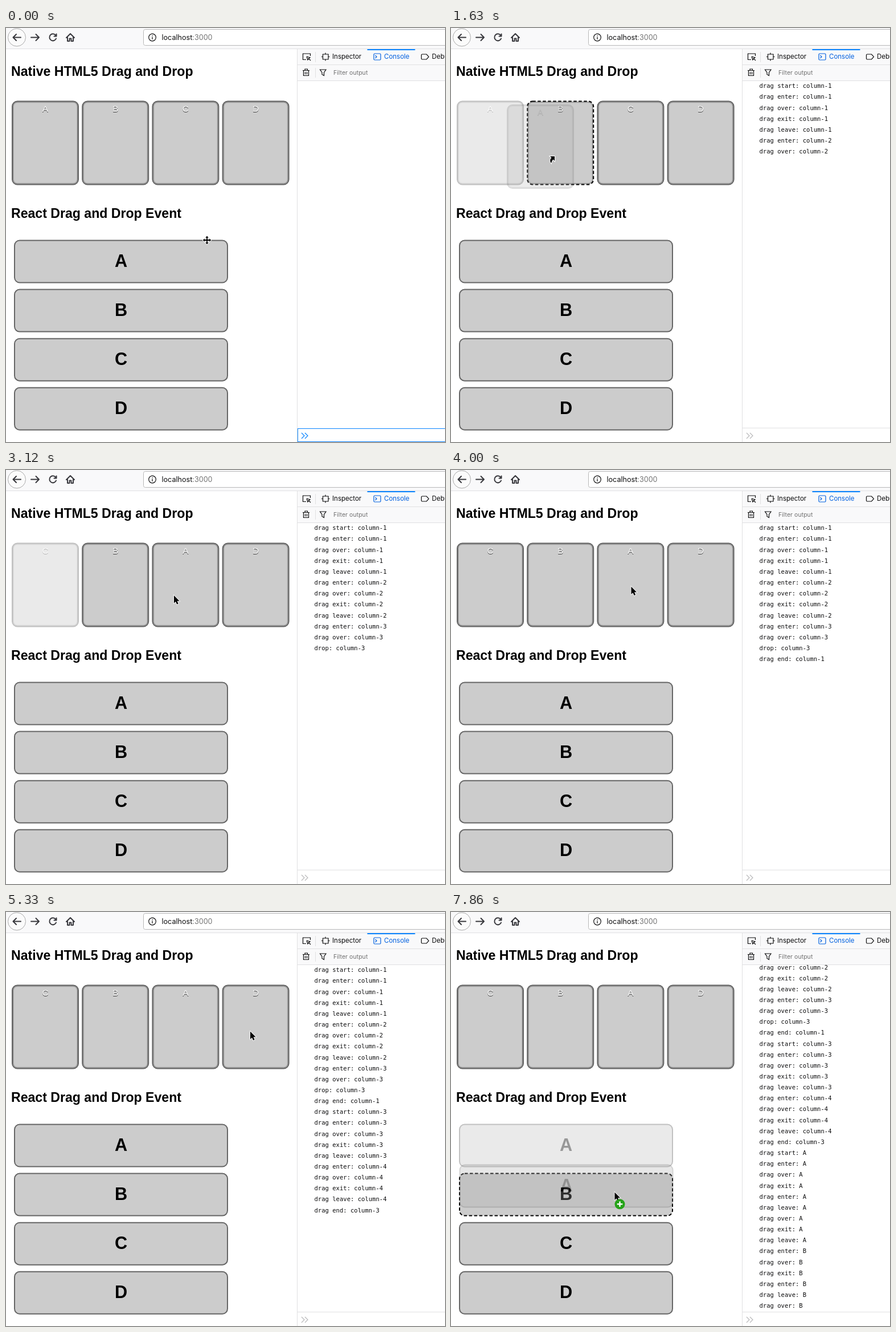
Animation of 771x726 px, one loop 8 s. Source, as an HTML page:

```html
<!DOCTYPE html>
<html lang="en">
<head>
<meta charset="utf-8">
<title>Drag and Drop</title>
<style>
  html, body { margin: 0; width: 100%; height: 100%; overflow: hidden; background: #fff; }
  svg { display: block; }
  text { white-space: pre; }
  .ui { font: 11.5px Inter, sans-serif; fill: #0c0c0d; }
  .heading { font: bold 23.1px "Liberation Sans", sans-serif; }
  .column { font: 15.4px "Liberation Sans", sans-serif; text-anchor: middle; }
  .row { font: bold 30.7px "Liberation Sans", sans-serif; text-anchor: middle; }
  .log { font: 10.56px "DejaVu Sans Mono", monospace; fill: #0c0c0d; }
  .icon { fill: none; stroke: #0c0c0d; stroke-width: 1.2; }
  .nav { fill: none; stroke: #38383d; stroke-width: 2; stroke-linecap: round; stroke-linejoin: round; }
  .line { fill: none; stroke: #e0e0e2; }
</style>
</head>
<body>
<svg width="771" height="726" viewBox="0 0 771 726">
  <clipPath id="console"><rect x="512" y="93" width="259" height="608"/></clipPath>

  <!-- browser toolbar -->
  <rect width="771" height="36" fill="#f9f9fa"/>
  <path class="line" d="M0 36.5H771"/>
  <circle cx="19" cy="16.5" r="15.5" fill="#fbfbfb" stroke="#aaa"/>
  <path class="nav" d="M26 16.5H13M18 11l-5.5 5.5L18 22M44 16.5H58M52.500 11l5.500 5.500L52.500 22"/>
  <path class="nav" d="M87 12.500A6 6 0 1 0 88 18.500M88.500 10.500V14.500H84.500"/>
  <path class="nav" stroke-width="1.800" d="M106 17l7-7 7 7M108 16.500V23H111.500V18.500H114.500V23H118V16.500"/>
  <rect x="241.500" y="2.500" width="540" height="28" rx="3" fill="#fff" stroke="#b8b8b8"/>
  <circle class="icon" cx="257" cy="16.500" r="6.300" stroke="#555"/>
  <path class="icon" stroke="#555" d="M257 15.500V20M257 12.700V14.200"/>
  <text class="ui" x="273.500" y="21.300" style="font-size:12.6px">localhost<tspan fill="#737373">:3000</tspan></text>

  <!-- developer tools -->
  <rect x="512" y="37" width="259" height="55" fill="#f9f9fa"/>
  <path class="line" d="M511.500 37V726M512 64.500H771M512 92.500H771M543.500 42V60M543.500 70V87"/>
  <rect x="634.500" y="37" width="84" height="2" fill="#0a84ff"/>
  <path class="icon" d="M527 55.500H521.500V45H534.500V49M528 50l2 6 1.500-2.500L535 57M528 50l6 2-2.500 1.500"/>
  <path class="icon" d="M556.500 46H566V55H556.500ZM561 43.500V46M561 55V57.500M554 50.500H556.500M566 50.500H568.500"/>
  <g class="icon" style="stroke:#0060df"><rect x="646" y="45" width="12" height="11" rx="1.500"/><path d="M648.500 48l2.500 2.500-2.500 2.500"/></g>
  <path class="icon" d="M731 46H738.500L742.500 50.500 738.500 55H731Q729.500 55 729.500 53.500V47.500Q729.500 46 731 46Z"/>
  <path class="icon" d="M521 74.500H533M525 74V72H529.500V74M522.500 75V83.500H531.500V75M525.500 77V81.500M528.500 77V81.500"/>
  <path class="icon" d="M551.500 73H562L558.500 78V83.500L555 81.500V78Z"/>
  <g class="ui">
    <text x="573" y="54">Inspector</text>
    <text x="664" y="54" fill="#0060df">Console</text>
    <text x="748" y="54">Debugger</text>
    <text x="575" y="82" fill="#737373" style="font-size:10.6px">Filter output</text>
  </g>

  <text class="heading" x="9" y="83.500">Native HTML5 Drag and Drop</text>
  <text class="heading" x="9" y="332.500">React Drag and Drop Event</text>
  <g id="scene"></g>
</svg>
<script>
const LOOP = 8000, TICK = 148, ROW = 19.15;

// Pointer path: tick, x, y, shape
const path = [
  [0, 353, 372, 'move'], [3, 172, 254, 'move'], [4, 172, 254, 'move'], [5, 118, 232, 'move'],
  [6, 89, 225, 'arrow'], [7, 97, 226, 'link'], [9, 138, 229, 'link'], [11, 177, 231, 'link'],
  [13, 190, 230, 'link'], [15, 260, 228, 'link'], [16, 273, 227, 'link'], [18, 297, 222, 'link'],
  [20, 297, 222, 'link'], [21, 295, 220, 'arrow'], [23, 295, 220, 'arrow'], [24, 312, 216, 'move'],
  [25, 326, 214, 'move'], [27, 316.5, 204.5, 'arrow'], [28, 316.5, 204.5, 'arrow'],
  [29, 324, 206, 'link'], [32, 430, 212, 'link'], [34, 430, 212, 'link'], [35, 429, 209.5, 'arrow'],
  [41, 429, 209.5, 'arrow'], [42, 424, 225, 'move'], [43, 379, 290, 'arrow'], [45, 300, 448, 'move'],
  [46, 283, 436, 'move'], [47, 283, 436, 'move'], [48, 285.5, 430, 'copy'], [49, 285.5, 440, 'copy'],
  [51, 287, 489, 'copy'], [52, 287, 489, 'copy'], [53, 287.5, 491.5, 'copy']
];

const drags = [
  { group: 'column', item: 0, start: 7, drop: 21, end: 22, grab: [89, 224.5] },
  { group: 'column', item: 2, start: 29, drop: 35, end: 36, grab: [317, 207] },
  { group: 'row', item: 0, start: 49, drop: 99, end: 99, grab: [287, 420.5] }
];

const events = [
  [7, 'start 1,enter 1,over 1'], [9, 'exit 1,leave 1,enter 2,over 2'],
  [15, 'exit 2,leave 2,enter 3,over 3'], [21, 'drop 3'], [22, 'end 1'],
  [29, 'start 3,enter 3,over 3'], [31, 'exit 3,leave 3,enter 4,over 4'],
  [35, 'exit 4,leave 4'], [36, 'end 3'],
  [49, 'start A,enter A,over A,exit A,enter A,leave A,over A'],
  [50, 'exit A,leave A,enter B,over B'], [51, 'exit B,enter B,leave B,over B']
];

const groups = {
  column: { w: 118, h: 148, base: 19, at: i => [10 + 123.2 * i, 127.5], hit: (x, y) => (x - 10) / 123.2 },
  row: { w: 376, h: 76, base: 47, at: i => [14, 371.5 + 86.1 * i], hit: (x, y) => (y - 371.5) / 86.1 }
};

const arrow = '<path d="M0 0V13.500L3 10.700 5.200 15.600 7.600 14.600 5.500 9.800H9.600Z" stroke="#fff" paint-order="stroke" stroke-width="1.600"/>';
const pointers = {
  arrow,
  move: '<path transform="scale(.9)" d="M0-8L3-4.700H1V-1H4.700V-3L8 0 4.700 3V1H1V4.700H3L0 8-3 4.700H-1V1H-4.700V3L-8 0-4.700-3V-1H-1V-4.700H-3Z" stroke="#fff" stroke-width="2" paint-order="stroke"/>',
  link: '<path d="M-3-6H5V2L2.500-.500Q-.500 2-1 6Q-5 1-.500-3.500Z" stroke="#fff" stroke-width="2" paint-order="stroke"/>',
  copy: arrow + '<circle cx="9" cy="20.800" r="9" fill="#25a318"/><path d="M9 16V25.600M4.200 20.800H13.800" stroke="#fff" stroke-width="2.400"/>'
};

const outline = (g, inset, style) =>
  `<rect x="${inset}" y="${inset}" width="${g.w - 2 * inset}" height="${g.h - 2 * inset}" rx="${10 - inset}" ${style}/>`;

function card(kind, [x, y], label, { opacity = 1, over = false, ghost = false } = {}) {
  const g = groups[kind], isColumn = kind === 'column';
  const border = over ? 'stroke="#000" stroke-dasharray="5.5 3.5"' : 'stroke="#666"';
  const text = (dy, fill) => `<text class="${kind}" x="${g.w / 2}" y="${g.base + dy}" fill="${fill}">${label}</text>`;
  return `<g transform="translate(${x} ${y})" opacity="${opacity}">`
    + outline(g, 1, `fill="${ghost ? '#aaa' : '#ccc'}" stroke-width="2" ${border}`)
    + (isColumn ? outline(g, 2.5, 'fill="none" stroke="#000" stroke-opacity=".35"')
      + outline(g, 3.5, 'fill="none" stroke="#000" stroke-opacity=".1"')
      + text(1, '#333') + text(0, ghost ? '#888' : '#fff') : text(0, '#000'))
    + '</g>';
}

function pointerAt(tick) {
  const i = path.findLastIndex(key => key[0] <= tick);
  const [t0, x0, y0, shape] = path[i], [t1, x1, y1] = path[i + 1] || [t0 + 1, x0, y0];
  const k = (tick - t0) / (t1 - t0);
  return { x: x0 + (x1 - x0) * k, y: y0 + (y1 - y0) * k, shape };
}

function consoleLog(tick) {
  const lines = events.filter(e => e[0] <= tick).flatMap(e => e[1].split(','));
  const scroll = Math.max(0, lines.length * ROW - 608);
  return '<g class="log" clip-path="url(#console)">' + lines.map((line, i) => {
    const [verb, id] = line.split(' ');
    const message = (verb === 'drop' ? verb : 'drag ' + verb) + ': ' + (id > 0 ? 'column-' + id : id);
    return `<text x="541.5" y="${105.3 + i * ROW - scroll}">${message}</text>`;
  }).join('') + '</g>';
}

function prompt(tick) {
  const focused = tick < 6;
  return (focused ? '<rect x="512.5" y="702.5" width="270" height="23" fill="#fff" stroke="#0a84ff"/>'
      : '<path class="line" d="M512 701.500H771"/>')
    + `<path d="M519 710l5 5-5 5M525 710l5 5-5 5" fill="none" stroke-width="1.2" stroke="${focused ? '#0a84ff' : '#b8b8ba'}"/>`
    + (tick === 3 || tick === 4 ? '<path d="M532.500 708V721" stroke="#000"/>' : '');
}

function scene(tick) {
  const pointer = pointerAt(tick);
  const drag = drags.find(d => tick >= d.start && tick < d.end);
  const held = drag && tick < drag.drop;
  const labels = { column: tick < 21 ? 'ABCD' : 'CBAD', row: 'ABCD' };
  let out = '';
  for (const kind in groups) {
    const active = drag && drag.group === kind;
    const target = active && held ? Math.floor(groups[kind].hit(pointer.x, pointer.y)) : -1;
    [...labels[kind]].forEach((label, i) => {
      out += card(kind, groups[kind].at(i), label,
        { opacity: active && drag.item === i ? 0.4 : 1, over: i === target });
    });
  }
  if (held) {
    const [x, y] = groups[drag.group].at(drag.item), [gx, gy] = drag.grab;
    out += card(drag.group, [x + pointer.x - gx, y + pointer.y - gy], labels[drag.group][drag.item],
      { opacity: drag.group === 'row' ? 0.28 : 0.22, ghost: true });
  }
  return out + consoleLog(tick) + prompt(tick)
    + `<g transform="translate(${pointer.x} ${pointer.y})">${pointers[pointer.shape]}</g>`;
}

const stage = document.getElementById('scene');
let shown = -1;
function render() {
  const tick = Math.min(53, Math.floor((performance.now() % LOOP + 8) / TICK));
  if (tick !== shown) stage.innerHTML = scene(shown = tick);
  requestAnimationFrame(render);
}
render();
</script>
</body>
</html>
```
